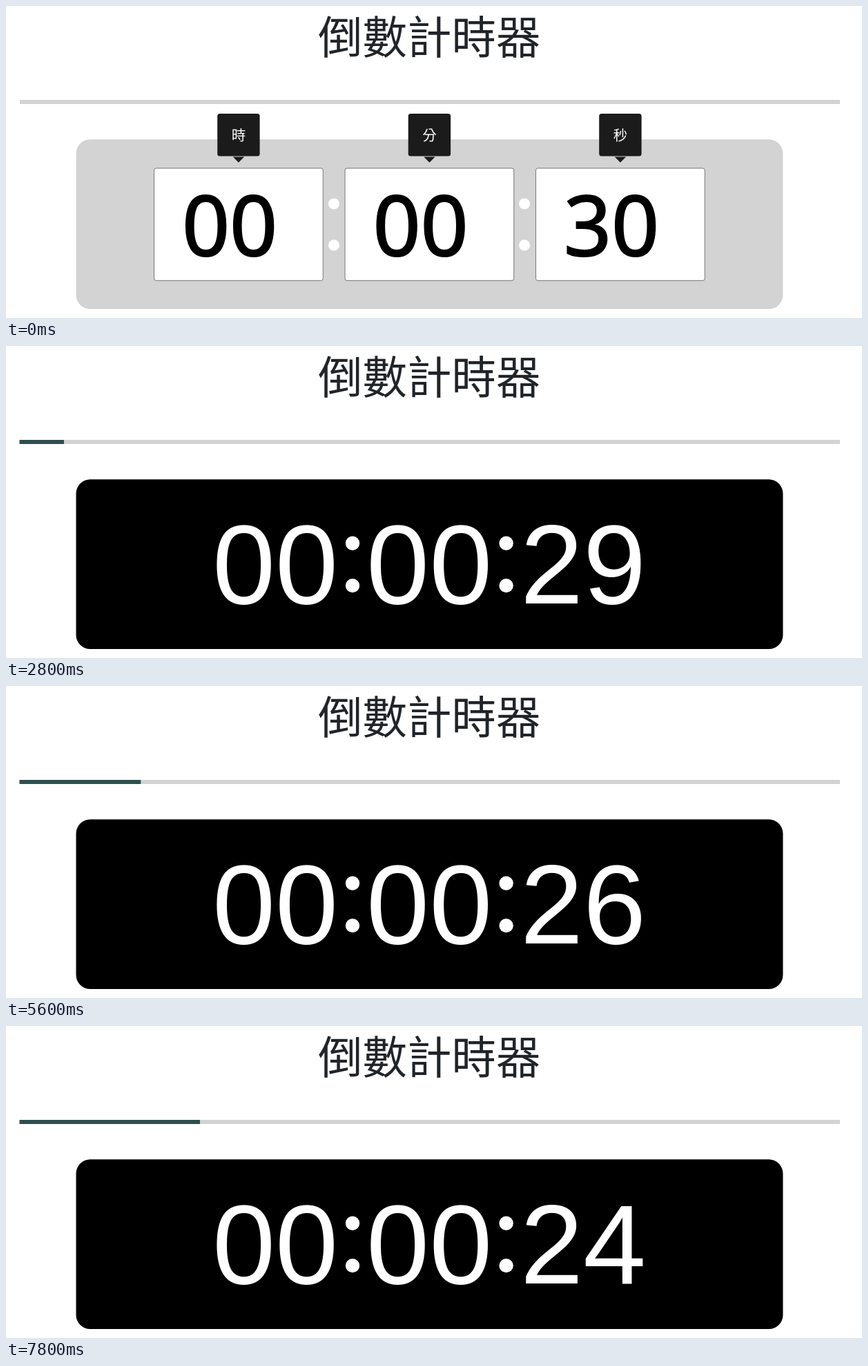
These frames come from a looping animation (1240x452 px, 8000 ms). An HTML page:

```html
<!DOCTYPE html>
<html lang="zh-Hant">
<head>
<meta charset="utf-8">
<title>倒數計時器</title>
<style>
  html, body { margin: 0; width: 100%; height: 100%; overflow: hidden; background: #fff; }
  svg { display: block; }
  text { text-anchor: middle; }
  .cjk { font-family: "Noto Sans CJK TC", "Noto Sans CJK", sans-serif; }
  .title { font-size: 64.5px; fill: #212529; }
  .tip { font-size: 20.48px; fill: #fff; }
  .field { font: 121px "Noto Sans", sans-serif; text-anchor: start; stroke: #000; stroke-width: 2; }
  .digits { font: 163.84px "Liberation Sans", Arial, sans-serif; fill: #fff; }
</style>
</head>
<body>
<svg width="1240" height="452" viewBox="0 0 1240 452">
  <text class="cjk title" x="613.3" y="69">倒數計時器</text>
  <rect x="20" y="136" width="1188" height="6" fill="#d3d3d3"/>
  <rect id="bar" x="19.5" y="136" width="0" height="6" fill="#2f4f4f"/>
  <rect id="panel" x="101.5" y="193.3" width="1024" height="245.76" rx="20.5"/>
  <g id="setup"></g>
  <g id="clock"></g>
</svg>
<script>
const LOOP = 8000, START = 1200, STEP = 200;
const TOTAL = 30, BAR_LEFT = 19.5, BAR_RATE = 39.6;

// Right end of the progress bar: [time in ms, x]
const PROGRESS = [
  [1200, 20.5], [2200, 59], [2800, 84], [3400, 109], [4000, 134], [4600, 160],
  [5000, 172], [5800, 203], [6200, 222], [7000, 254], [7800, 281]
];

const byId = id => document.getElementById(id);
const bar = byId("bar"), panel = byId("panel"), setup = byId("setup"), clock = byId("clock");
const pad = n => String(n).padStart(2, "0");

const dots = (x, ys, r) =>
  ys.map(y => `<circle cx="${x}" cy="${y}" r="${r}" fill="#fff"/>`).join("");

// One input box with its label, centred on mid
function field(mid, label, value) {
  return `
    <rect x="${mid - 122.37}" y="235" width="244.74" height="162.8" rx="3" fill="#fff" stroke="#767676"/>
    <text class="field" x="${mid - 82}" y="362.3">${value}</text>
    <g fill="#1b1b1b">
      <rect x="${mid - 30.7}" y="156" width="61.4" height="61.4" rx="3.5"/>
      <path d="M${mid - 8.2} 218.5h16.4l-8.2 8.2z"/>
      <text class="cjk tip" x="${mid}" y="194.8">${label}</text>
    </g>`;
}

setup.innerHTML =
  field(336.9, "時", "00") + field(613.4, "分", "00") + field(889.9, "秒", pad(TOTAL)) +
  dots(475, [286.5, 346.5], 8) + dots(751, [286.5, 346.5], 8);

clock.innerHTML =
  [390, 613.2, 836].map(x => `<text class="digits" x="${x}" y="373.3">00</text>`).join("") +
  dots(502, [285.7, 347.1], 10.2) + dots(724.6, [285.7, 347.1], 10.2);
const seconds = clock.querySelectorAll("text")[2];

function barEnd(t) {
  const last = PROGRESS.length - 1;
  let i = 1;
  while (i < last && t > PROGRESS[i][0]) i++;
  const [t0, x0] = PROGRESS[i - 1], [t1, x1] = PROGRESS[i];
  return x0 + (x1 - x0) * (t - t0) / (t1 - t0);
}

function draw(ms) {
  const t = Math.floor((ms % LOOP) / STEP) * STEP;
  const running = t >= START;
  setup.style.display = running ? "none" : "";
  clock.style.display = running ? "" : "none";
  panel.setAttribute("fill", running ? "#000" : "#d3d3d3");
  const width = running ? barEnd(t) - BAR_LEFT : 0;
  bar.setAttribute("width", width);
  seconds.textContent = pad(TOTAL - Math.floor(width / BAR_RATE));
}

let origin = null;
function tick(now) {
  if (origin === null) origin = now;
  draw(now - origin);
  requestAnimationFrame(tick);
}
draw(0);
requestAnimationFrame(tick);
</script>
</body>
</html>
```
